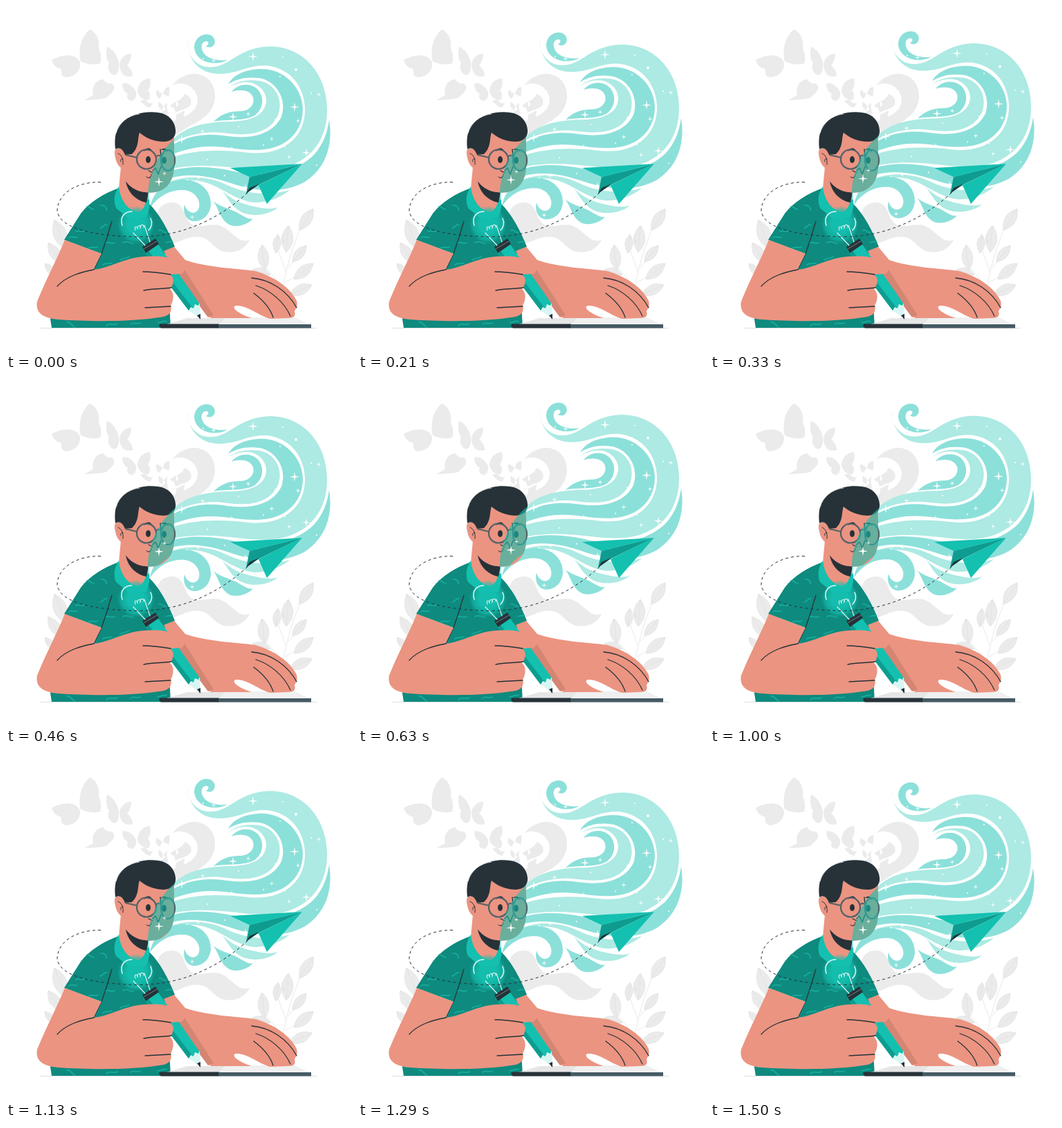
An HTML page that plays this animation: 500x500 px, repeating every 1.54 s.

```html
<!DOCTYPE html>
<html lang="en">
<head>
<meta charset="utf-8">
<title>Writing with imagination</title>
<style>
html, body { margin: 0; width: 100%; height: 100%; overflow: hidden; background: #fff; }
svg { display: block; width: 100vw; height: 100vh; }
.grey { fill: #ebebeb; }
.mid { fill: #8ce0da; }
.light { fill: #aceae3; }
.skin { fill: #eb9481; }
.ink { fill: #263238; }
.teal { fill: #14c0b0; }
.line { fill: none; stroke: #263238; stroke-linecap: round; stroke-linejoin: round; }
.squiggle { fill: none; stroke: #17ad9d; stroke-width: 1.7; stroke-linecap: round; }
</style>
</head>
<body>
<svg viewBox="0 0 500 500">
<defs>
  <clipPath id="headClip">
    <path d="M158 208C155 176 178 155 210 153C236 153 247 167 245 184C243 190 241 194 243 200L243 231C243 253 232 266 216 269L206 270L208 296L190 298L166 262Z"/>
  </clipPath>
  <radialGradient id="glow">
    <stop offset=".45" stop-color="#14c0b0" stop-opacity=".95"/>
    <stop offset=".8" stop-color="#14c0b0" stop-opacity=".6"/>
    <stop offset="1" stop-color="#14c0b0" stop-opacity="0"/>
  </radialGradient>
</defs>

<g class="grey">
  <!-- butterflies -->
  <path d="M107 82C104 73 90 65 66 78C68 86 74 90 80 91C79 98 81 103 88 103C98 102 108 95 107 82ZM108 80C104 66 108 44 121 34C131 38 136 50 134 62C138 69 138 77 136 83C127 86 117 84 108 80Z"/>
  <path d="M163 82C160 70 154 62 146 59C144 68 145 78 149 82C145 90 150 99 157 100C162 98 164 92 163 82ZM164 84C166 74 174 68 181 69C181 77 178 83 175 86C180 90 183 95 183 101C173 105 164 98 164 84Z"/>
  <path d="M126 129C123 118 130 106 141 106C143 111 148 112 153 112C158 116 157 121 153 125C147 131 145 132 146 133C134 135 124 136 114 136C118 133 122 131 126 129Z"/>
  <path d="M188 124C183 114 174 109 168 112C168 120 172 125 176 127C173 132 177 137 182 137C187 136 189 130 188 124ZM190 124C190 113 198 105 208 104C210 112 208 119 205 122C209 126 209 132 206 136C199 137 192 131 190 124Z"/>
  <path d="M194 137L201 135L206 140L212 141L208 147L202 145ZM226 127L218 121C215 127 218 132 222 134ZM227 127C228 120 232 117 236 117C237 122 236 127 235 131Z"/>
  <path d="M227 144L221 138C219 144 221 149 226 151ZM228 145L233 139L232 152ZM222 155L233 148L234 158ZM237 144L245 138L247 150Z"/>
  <!-- smoke -->
  <path d="M241 114C250 103 261 98 273 98C291 99 303 113 302 132C300 156 281 166 264 174L240 190L238 168C256 160 276 156 277 136C277 119 258 107 241 114Z"/>
  <path d="M258 127C268 130 272 142 262 147L245 154L243 147C248 146 252 142 246 138C251 136 256 133 258 127ZM246 157L258 151L257 162L245 166Z"/>
  <path d="M218 303C220 289 230 283 242 284C259 286 256 307 269 316C284 323 298 310 315 320C331 330 336 343 352 338C345 353 329 358 315 355C300 351 295 336 281 334C266 331 253 340 242 343L230 325Z"/>
</g>
<g id="plants" class="grey" stroke="#e0e0e0" stroke-width=".7"></g>

<path d="M49 465.500H449" stroke="#d5d9dc" stroke-width=".8"/>

<!-- dream swirl -->
<g class="float">
  <path class="mid" d="M320 78C301 88 274 81 272 60C272 48 281 41 290 41C299 41 304 49 301 55C299 60 293 61 289 58C293 56 294 52 290 51C283 51 281 58 284 65C288 75 303 80 320 78Z"/>
  <path class="light" d="M262 49C261 66 270 85 290 88C322 92 332 61 378 58.500C430 57 463 98 464 148C465 200 432 231 388 236C345 241 300 222 236 236L236 220C275 206 315 208 350 212C400 217 433 190 432 148C431 112 405 86 372 86C345 87 335 98 308 98C278 98 262 76 262 49Z"/>
  <path class="mid" d="M321 113C330 97 350 91 370 91C402 91 429 118 429 150C428 188 398 208 362 208C320 209 295 192 236 216L236 203C262 187 290 183 320 188C355 193 386 185 398 160C407 135 390 107 365 104C348 102 333 105 321 113Z"/>
  <path class="light" d="M322 117C335 108 350 106 365 108C388 111 402 135 393 158C380 185 350 188 320 184C295 180 265 183 236 200L240 194C258 175 285 168 320 167C350 167 374 160 376 138C377 122 362 109 345 110C335 111 328 114 322 117Z"/>
  <path class="mid" d="M326 124C335 112 352 111 362 119C374 129 373 150 358 159C342 167 320 163 300 167C312 155 325 152 338 152C352 152 360 142 357 132C353 121 338 120 326 124Z"/>
  <path class="mid" d="M467 165C472 195 466 232 432 254C400 272 360 268 325 256C295 246 265 239 230 251L234 239C270 229 300 232 335 240C380 248 420 240 445 215C457 202 464 185 467 165Z"/>
  <path class="light" d="M226 259C258 242 292 246 318 258C345 271 375 275 410 266C395 279 375 284 360 284C332 282 312 261 285 254C266 250 246 251 226 262Z"/>
  <path class="mid" d="M208 292C212 268 230 252 256 251C282 251 297 268 296 288C294 304 282 312 270 311C260 309 255 298 258 287C262 300 273 302 278 294C283 284 275 268 258 266C240 265 222 272 208 292Z"/>
  <path class="mid" d="M297 279C305 290 325 292 340 302C348 306 352 309 357 307C350 316 335 320 325 317C308 310 308 290 297 279Z"/>
  <path class="light" d="M312 266C325 280 340 286 360 290C372 293 384 294 393 291C380 302 360 304 346 300C328 294 322 280 312 266Z"/>
</g>

<!-- neck and shirt -->
<path fill="#0e8a7e" d="M163 263C141 271 121 283 108 300L84 338L138 358L127 382L64 452L66 465H238L236 430L230 355L244 348C235 325 222 300 206 285L190 300Z"/>
<path class="skin" d="M166 232L163 264C166 285 180 298 194 299L205 282V245Z"/>
<path class="teal" d="M163 261C156 271 155 282 159 292L176 306L202 306C206 300 208 291 207 280L203 279C201 290 197 297 190 298C176 295 165 281 163 261Z"/>
<path class="ink" d="M173 253C180 263 192 270 206 269L203 284C190 282 176 271 173 253Z"/>
<g class="squiggle">
  <path d="M117 290C121 289 122 294 127 294M137 288C142 287 146 291 145 295M136 321C141 320 141 315 146 316M101 326C105 323 109 328 113 325M91 335C95 331 98 336 103 334M119 350C123 346 127 351 133 348"/>
  <path d="M143 343C148 339 151 345 157 342M169 342C174 338 177 343 184 343M165 367C170 363 174 366 178 362M221 324C225 322 227 328 231 327M231 342C234 339 237 342 240 340M140 374C145 370 148 374 153 371"/>
  <path d="M88 457C92 455 94 461 99 464M145 462C150 456 155 463 161 459M180 460C184 456 188 461 194 458M219 457C222 460 227 453 232 456"/>
</g>
<path class="line" stroke-width="1.200" d="M153 311C149 325 143 344 138 358L127 381"/>

<!-- head -->
<path class="skin" d="M173 213C166 203 156 204 157 213C158 225 164 237 172 235Z"/>
<path class="skin" d="M170 198C167 225 169 243 174 254C182 266 203 272 216 269C232 266 243 252 243 231V188L190 180Z"/>
<path class="line" stroke-width="1" d="M162 213C167 215 170 221 169 229M169 221C166 220 165 223 166 225"/>
<path class="ink" d="M158 207C156 190 159 176 168 168C178 156 203 151 220 154C235 156 244 166 245 179C246 189 239 196 228 196C213 196 201 190 193 183C190 189 193 204 182 214L172 215C169 207 164 203 158 207Z"/>
<path fill="none" stroke="#fff" stroke-width=".8" d="M159 184C163 169 176 158 193 156"/>
<path class="ink" d="M199 210C203 204 209 204 212 211C207 208 203 208 199 210ZM224 208C229 204 233 206 235 211C231 208 228 208 224 208Z"/>
<ellipse class="ink" cx="205.500" cy="222" rx="3.500" ry="5"/>
<ellipse class="ink" cx="228.500" cy="223" rx="3.500" ry="5"/>
<path class="line" stroke-width="1.300" d="M223 207L224 218M224 232L220 243L216 234L212 238M206 238L212 241"/>
<path fill="#d44b62" d="M204 247C207 250 210 249 210 244C208 247 206 248 204 247Z"/>
<path class="line" stroke-width="1" d="M203 247C207 250 210 248 210 243"/>
<g fill="none" stroke="#526169" stroke-width="2.200">
  <circle cx="203" cy="221.500" r="14"/>
  <ellipse cx="234" cy="223" rx="10" ry="15"/>
  <path d="M217 218C219 215 222 215 224 218M189 219L172 215"/>
</g>
<g clip-path="url(#headClip)">
  <path class="float teal" fill-opacity=".6" d="M252 187C232 197 214 224 207 255C204 270 204 285 208 295C214 279 226 266 252 252Z"/>
</g>
<g id="stars" class="float" fill="#fff"></g>

<!-- notebook -->
<path fill="#e6e6e6" d="M232 460L262 451H318L308 460Z"/>
<path fill="#f0f0f0" d="M308 460L318 450H418L437 460Z"/>
<path class="ink" d="M222 459.500H308V465.500H224Q220 463 222 459.500Z"/>
<path fill="#455a64" d="M307 460H441V465.500H307Z"/>

<!-- far arm -->
<path class="skin" d="M228 354L243 348L259 367C290 378 330 379 360 383C388 391 411 407 420 426C422 436 419 436 417 441C419 448 416 451 408 451L382 452C366 448 348 432 333 433C325 434 331 443 355 451H296L250 400Z"/>
<path fill="#d58573" d="M250 388L258 381L300 447L292 450L262 410Z"/>
<g class="line" stroke-width="1.300">
  <path d="M355 393C382 395 407 412 420 436M361 404C383 411 402 428 411 448M358 415C370 424 382 437 386 450"/>
</g>

<!-- bulb pencil -->
<circle cx="188" cy="316" r="27" fill="url(#glow)"/>
<path class="teal" d="M199 354L219 343L281 432L264 440Z"/>
<path fill="#0f9c90" d="M199 354L204 351L270 437L264 440Z"/>
<path fill="#d9f6f2" d="M264 440L267 435L271 437L273 431L278 433L280 429L281 452Z"/>
<path class="ink" d="M276 447L281 445L281 453Z"/>
<path class="ink" d="M197 348L216 336L221 344L202 357Z"/>
<path fill="none" stroke="#8996a0" stroke-width=".8" d="M199 351L218 340"/>
<g fill="none" stroke="#d5f5f1" stroke-linecap="round">
  <path stroke-width="1.200" d="M201 346L184 328M208 341L200 317M187 324C184 317 191 318 190 323C189 316 196 316 194 321C193 315 200 315 199 320"/>
  <path stroke-width="1.600" d="M168 317C164 304 172 297 182 297M209 307C212 314 210 320 206 324"/>
</g>

<!-- near arm -->
<path class="skin" d="M85 338C74 365 59 393 45 427C42 443 53 451 75 453C120 456 180 457 228 449C238 446 240 440 238 433C243 424 243 414 237 409C244 400 243 392 237 388L254 387C261 381 259 373 250 369C232 361 216 361 200 362C170 364 150 379 126 381L138 358Z"/>
<g class="line" stroke-width="1.300">
  <path d="M74 405C87 391 106 385 127 381M198 384C212 384 226 386 238 388M199 411C213 408 226 409 239 407M201 436L238 434"/>
</g>

<!-- paper plane -->
<path class="line" stroke-width="1" stroke-dasharray="4 4" style="stroke-linecap:butt" d="M137 254.500C99 254 74 273 74 296C77 322 130 333 194 333.500C262 333 316 301 350 269"/>
<path fill="#0f9c90" d="M352 247L428 228L366 258L347 271Z"/>
<path class="ink" d="M347 271L352 263L366 257Z"/>
<path class="teal" d="M324 234L428 228L352 247ZM428 228L377 286L365 259Z"/>
</svg>
<script>
const $ = id => document.getElementById(id);

const leaf = ([x, y, tx, ty]) => {
  const mx = (x + tx) / 2, my = (y + ty) / 2, dx = (ty - y) * .42, dy = (x - tx) * .42;
  return `<path d="M${x} ${y}Q${mx + dx} ${my + dy} ${tx} ${ty}Q${mx - dx} ${my - dy} ${x} ${y}ZL${tx} ${ty}"/>`;
};
const leaves = [
  [424, 324, 444, 293], [405, 356, 408, 317], [390, 357, 393, 330], [374, 382, 370, 345],
  [414, 370, 434, 346], [416, 395, 444, 372], [410, 417, 442, 403], [382, 388, 356, 381],
  [402, 343, 400, 337], [87, 352, 70, 309], [80, 372, 61, 342], [72, 390, 56, 372]
];
$('plants').innerHTML =
  '<path fill="none" d="M397 420C405 380 414 345 428 317M405 385L392 350M398 405L373 375M408 378L420 364M403 400L420 390M92 378L78 330"/>' +
  leaves.map(leaf).join('');

const star = ([x, y, r]) => {
  const k = r * .15;
  return `<path d="M${x} ${y - r}L${x + k} ${y - k}L${x + r} ${y}L${x + k} ${y + k}L${x} ${y + r}L${x - k} ${y + k}L${x - r} ${y}L${x - k} ${y - k}Z"/>`;
};
const dot = ([x, y, r = 1]) => `<circle cx="${x}" cy="${y}" r="${r}"/>`;
const stars = [
  [357, 73, 7], [300, 79, 4], [417, 146, 7], [452, 128, 4], [328, 160, 6.5], [350, 156, 4],
  [254, 193, 6.5], [284, 181, 4], [326, 206, 4], [384, 192, 4], [422, 166, 4], [434, 212, 6.5],
  [409, 218, 4], [278, 248, 4], [346, 262, 5], [269, 305, 4], [221, 254, 7], [229, 242, 3.5]
];
const dots = [
  [285, 76], [400, 74], [419, 92, 2], [396, 102], [441, 126], [336, 174], [372, 201],
  [403, 203], [389, 164], [291, 222], [262, 251], [316, 245], [449, 230]
];
$('stars').innerHTML = stars.map(star).join('') + dots.map(dot).join('');

const LOOP = 1540, RISE = 10, HALF = 18, FPS = 24;
const floats = document.querySelectorAll('.float');

function draw() {
  const t = performance.now() % LOOP;
  const step = Math.min(2 * HALF, Math.floor((t + 4) * FPS / 1000));
  const dy = -RISE * (1 - Math.abs(step - HALF) / HALF);
  for (const el of floats) el.setAttribute('transform', `translate(0 ${dy.toFixed(3)})`);
  requestAnimationFrame(draw);
}
draw();
</script>
</body>
</html>
```
